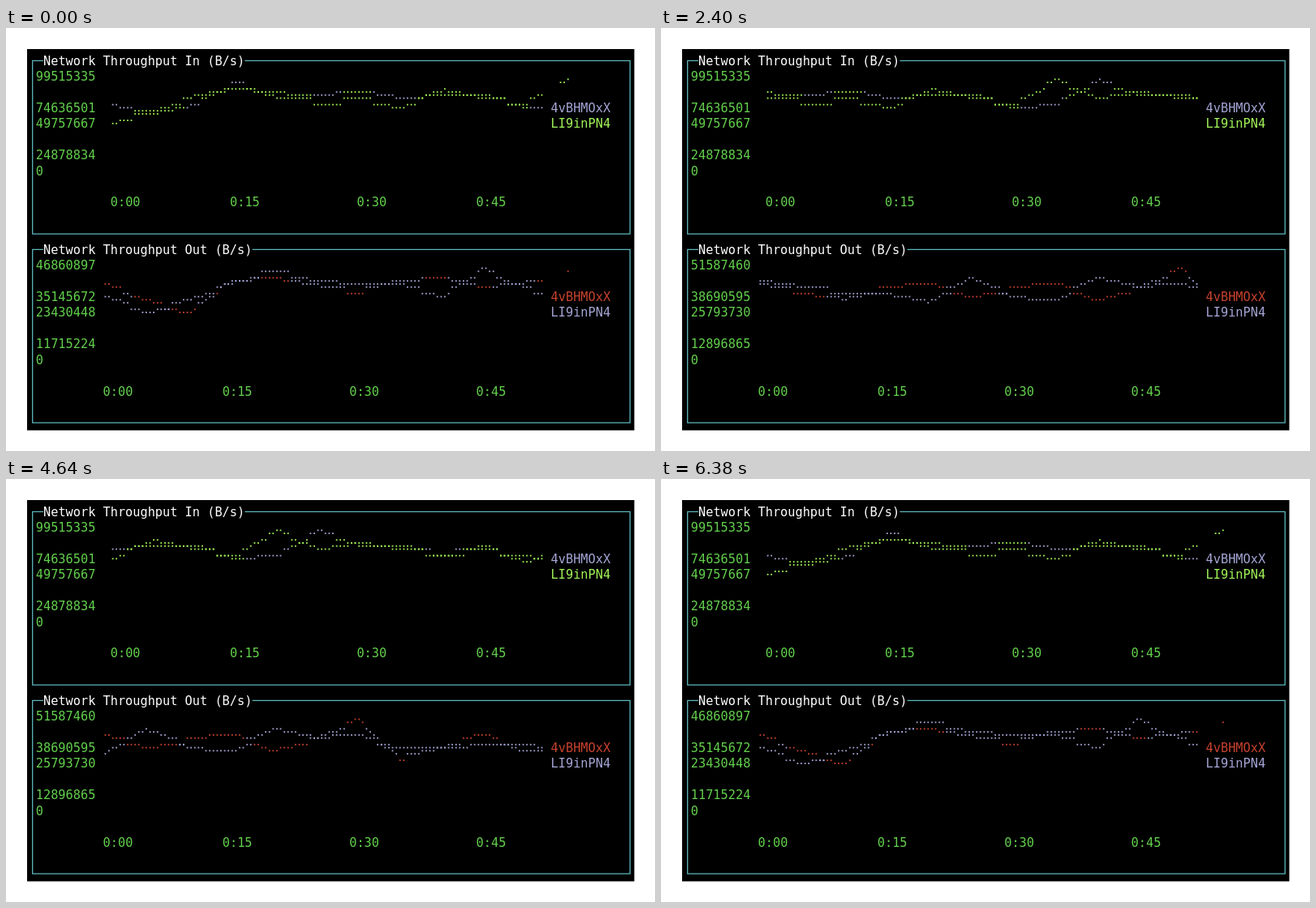
These frames come from a looping animation (800x522 px, 7220 ms). An HTML page with a canvas:

```html
<!DOCTYPE html>
<html>
<head>
<meta charset="utf-8">
<style>
  html, body { margin: 0; width: 100%; height: 100%; overflow: hidden; background: #fff; }
  canvas { display: block; }
</style>
</head>
<body>
<canvas id="stage" width="800" height="522"></canvas>
<script>
const ctx = document.getElementById('stage').getContext('2d');
const CELL_W = 9.2, CELL_H = 19.43;
const LOOP = 7220, REST = 6380, STEP = 640;
const AXIS = '#62cf4c', LIME = '#a2f558', LILAC = '#a5a5d6', RED = '#c8422f', CYAN = '#5cb6bd';
const POINTS = 12, ZERO_DOT = 26;

// Samples are heights in braille dots below the top of the plot.
const charts = [
  {
    title: 'Network Throughput In (B/s)', row: 0, col: 11, span: 122, phase: 330,
    ticks: [11, 27, 44, 60],
    scale: () => ({ zoom: 1, labels: ['99515335', '74636501', '49757667', '24878834', '0'] }),
    series: [
      { name: '4vBHMOxX', color: LILAC,
        data: [8, 11, 8, 2.7, 7, 6, 4.6, 7, 6, 6, 9, 8, 2.2, 6, 6, 8, 6, 10, 5, 14, 12, 9] },
      { name: 'LI9inPN4', color: LIME,
        data: [13, 10, 6.2, 4, 5, 8.1, 7, 9, 4.2, 7, 8, 2, 7, 5, 7, 8, 7, 8.4, 9, 9.5, 8, 7] }
    ]
  },
  {
    title: 'Network Throughput Out (B/s)', row: 12, col: 10, span: 124, phase: 570,
    ticks: [10, 26, 43, 60],
    scale: shift => shift < 3
      ? { zoom: 1.101, labels: ['46860897', '35145672', '23430448', '11715224', '0'] }
      : { zoom: 1, labels: ['51587460', '38690595', '25793730', '12896865', '0'] },
    series: [
      { name: '4vBHMOxX', color: RED,
        data: [7.7, 11.7, 14.4, 6.9, 6, 8.1, 9.7, 6.9, 6, 8.9, 7.3, 5.5, 10, 7, 2, 12, 9, 5.5, 10.5, 9, 14, 12] },
      { name: 'LI9inPN4', color: LILAC,
        data: [10.3, 14.4, 11.5, 7.5, 4.8, 6.9, 7.8, 8, 10.6, 4.2, 9, 10.3, 4, 6.8, 6, 9.2, 9.4, 8, 8, 10.3, 15, 13] }
    ]
  }
];

const cellX = col => 27.6 + CELL_W * col;
const cellY = row => 40.3 + CELL_H * row;

function text(str, col, row, color) {
  ctx.fillStyle = color;
  ctx.fillText(str, cellX(col), cellY(row) + 5.3);
}

function drawFrame({ title, row }) {
  const top = cellY(row), bottom = cellY(row + 11), left = 32.7, right = 769.2;
  ctx.strokeStyle = CYAN;
  ctx.lineWidth = 1.3;
  ctx.beginPath();
  ctx.moveTo(cellX(2), top);
  ctx.lineTo(left, top);
  ctx.lineTo(left, bottom);
  ctx.lineTo(right, bottom);
  ctx.lineTo(right, top);
  ctx.lineTo(cellX(2 + title.length), top);
  ctx.stroke();
  text(title, 2, row, '#fff');
}

function plot({ row, col, span, series }, shift, zoom) {
  const dots = [], cellColor = {};
  for (const { data, color } of series) {
    for (let s = 0; s <= span; s++) {
      const pos = s / span * (POINTS - 1);
      const i = Math.min(Math.floor(pos), POINTS - 2);
      const a = data[i + shift], b = data[i + shift + 1];
      const height = ZERO_DOT - (ZERO_DOT - a - (b - a) * (pos - i)) * zoom;
      const d = Math.round(height);
      const c = col + (s >> 1), r = d >> 2;
      if (r > 0 && c >= 69) continue; // covered by the legend
      const key = c + ',' + r;
      cellColor[key] = color; // a cell has one colour: the last series wins
      dots.push({ key, x: cellX(c) + 2.8 + 4.5 * (s & 1), y: cellY(row + 1 + r) - 4 + 3.8 * (d & 3) });
    }
  }
  for (const { key, x, y } of dots) {
    ctx.fillStyle = cellColor[key];
    ctx.fillRect(x - 0.9, y - 0.9, 1.8, 1.8);
  }
}

function draw(now) {
  const t = now % LOOP;
  ctx.fillStyle = '#fff';
  ctx.fillRect(0, 0, 800, 522);
  ctx.fillStyle = '#000';
  ctx.fillRect(26, 26, 748.5, 470.5);
  ctx.font = '15.28px "DejaVu Sans Mono", monospace';
  for (const chart of charts) {
    const shift = t < REST ? Math.floor((t + chart.phase) / STEP) : 0;
    const { zoom, labels } = chart.scale(shift);
    drawFrame(chart);
    labels.forEach((label, i) => text(label, 1, chart.row + 1 + Math.round(1.5 * i), AXIS));
    chart.ticks.forEach((col, i) => text('0:' + String(15 * i).padStart(2, '0'), col, chart.row + 9, AXIS));
    chart.series.forEach(({ name, color }, i) => text(name, 70, chart.row + 3 + i, color));
    plot(chart, shift, zoom);
  }
}

const start = performance.now();
function tick() {
  draw(performance.now() - start);
  requestAnimationFrame(tick);
}
tick();
</script>
</body>
</html>
```
